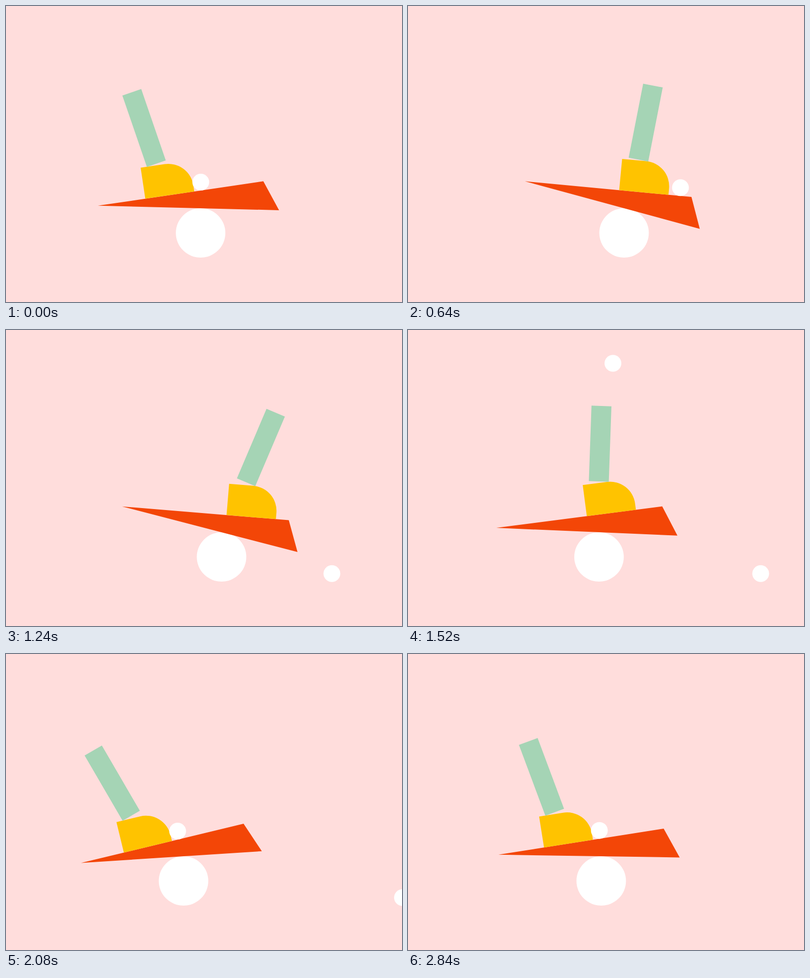
Write an HTML page that moves like this. It is 800x600 px and loops after 2.88 s.

```html
<!DOCTYPE html>
<html lang="en">
<head>
<meta charset="utf-8">
<title>Balance</title>
<style>
  html, body { margin: 0; width: 100%; height: 100%; overflow: hidden; background: #ffdddc; }
  svg { display: block; width: 100%; height: 100%; }
</style>
</head>
<body>
<svg viewBox="0 0 800 600">
  <circle id="roller" cy="460" r="50" fill="#fff"/>
  <g id="board">
    <path d="M-204.6-35.6H133.4L156.2 27.2Z" fill="#f34607"/>
    <g id="foot">
      <path d="M0 0V-63.6H49A51 51 0 0 1 100-12.6V0Z" fill="#ffc300"/>
      <rect id="leg" x="12.7" y="-216.3" width="40.3" height="153" fill="#a5d4b5"/>
    </g>
  </g>
  <circle id="leaving" r="17" fill="#fff"/>
  <circle id="arriving" r="17" fill="#fff"/>
</svg>
<script>
const LOOP = 2880, STEP = 40;
const BOARD_LEFT = -204.6, BOARD_TOP = -35.6, PIVOT_Y = 410;
const FOOT_TO_BALL = 115.8, BALL_LIFT = 16.7;
const ROLL = 400, DROP = 800, GROUND = 1110, LANDING = 1840;
const HIDDEN = [-50, -50];
const $ = id => document.getElementById(id);

// Same as cubic-bezier(a, 0, b, 1).
function ease(u, [a, b]) {
  let low = 0, high = 1, s;
  for (let i = 0; i < 24; i++) {
    s = (low + high) / 2;
    const x = 3 * s * (1 - s) * (a * (1 - s) + b * s) + s ** 3;
    if (x < u) low = s; else high = s;
  }
  return s * s * (3 - 2 * s);
}

// Swings from low (at lowTime) up to high (at highTime) and back, once per loop.
function swing(low, lowTime, high, highTime, easeUp, easeDown) {
  const down = lowTime - highTime, up = LOOP - down;
  return t => {
    const since = (t - lowTime + LOOP) % LOOP;
    const level = since < up ? ease(since / up, easeUp)
                             : 1 - ease((since - up) / down, easeDown);
    return low + (high - low) * level;
  };
}

const rollerX = swing(356.3, 1770, 444.5, 1020, [.54, .64], [.59, .63]);
const boardAngle = swing(-13.85, 1770, 7.55, 1020, [.8, .6], [.5, .64]);
const footSlide = swing(77, 2400, 214, 1120, [.53, .5], [.45, .46]);
const legAngle = swing(-32, 2250, 26, 1130, [.41, .75], [.23, .51]);

const travel = (from, speed, gain, d) => from + speed * d + gain * d * d;

function onBoard(along, x, angle) {
  const r = angle * Math.PI / 180, c = Math.cos(r), s = Math.sin(r);
  const lx = BOARD_LEFT + along, ly = BOARD_TOP - BALL_LIFT;
  return [x + lx * c - ly * s, PIVOT_Y + lx * s + ly * c];
}

// Pushed by the foot, rolls off the end, drops and runs out along the ground.
function leavingBall(t, pushed, x, angle) {
  if (t < DROP) return onBoard(travel(pushed, 0, .000121, Math.max(0, t - ROLL)), x, angle);
  const d = t - DROP;
  if (t < GROUND) return [travel(579.5, .2875, -.00039, d), travel(373.2, .119, .0009, d)];
  return [travel(631, .216, -.000042, t - GROUND), 493.7];
}

// Falls from above and settles against the foot.
function arrivingBall(t, pushed, x, angle) {
  if (t >= LANDING) return onBoard(pushed, x, angle);
  const d = t - 1520;
  return d < -200 ? HIDDEN : [travel(414, -.0676, -.000154, d), travel(67.5, .6945, .0006, d)];
}

function place(id, [x, y]) {
  $(id).setAttribute("cx", x);
  $(id).setAttribute("cy", y);
}

function draw(t) {
  const x = rollerX(t), angle = boardAngle(t), slide = footSlide(t);
  const lean = legAngle(t) - angle, pushed = slide + FOOT_TO_BALL;
  $("roller").setAttribute("cx", x);
  $("board").setAttribute("transform", `translate(${x} ${PIVOT_Y}) rotate(${angle})`);
  $("foot").setAttribute("transform", `translate(${BOARD_LEFT + slide} ${BOARD_TOP})`);
  // The leg rocks over whichever lower corner it leans towards.
  $("leg").setAttribute("transform", `rotate(${lean} ${lean < 0 ? 12.7 : 53} -63.3)`);
  place("leaving", leavingBall(t, pushed, x, angle));
  place("arriving", arrivingBall(t, pushed, x, angle));
}

const start = performance.now();
function tick() {
  const t = (performance.now() - start) % LOOP;
  draw(Math.floor(t / STEP) * STEP);
  requestAnimationFrame(tick);
}
tick();
</script>
</body>
</html>
```
